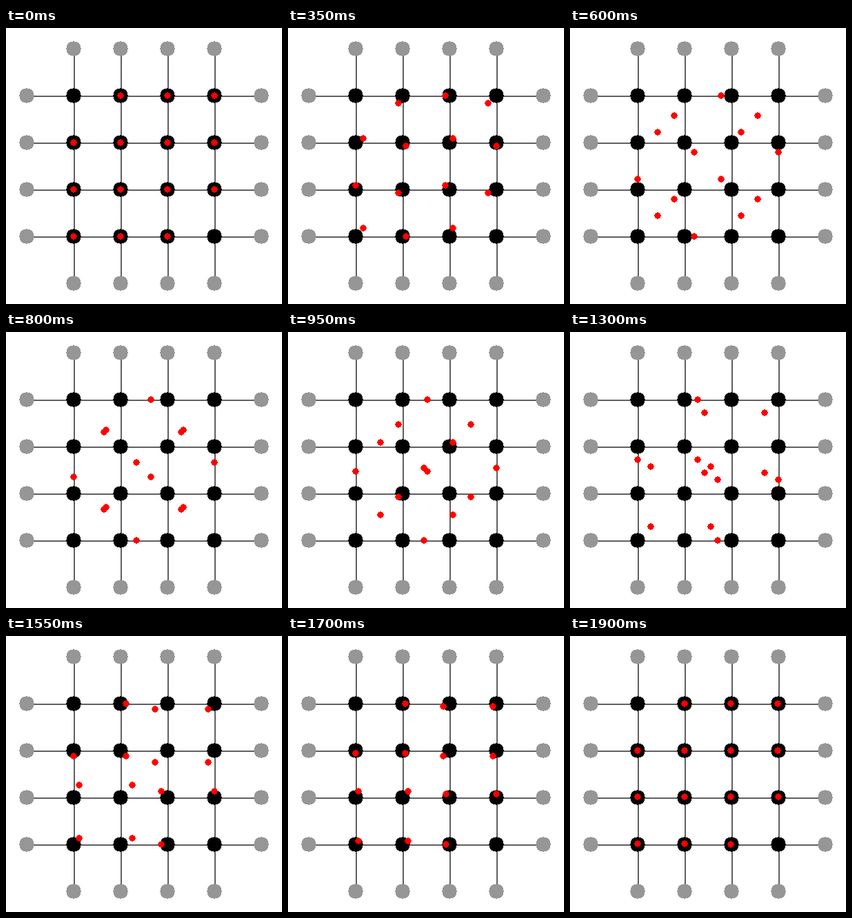
A matplotlib script for the animation above (2 s loop, 400 by 400 pixels).

```python
import math
import matplotlib.pyplot as plt
from matplotlib.animation import FuncAnimation
from matplotlib.patches import Circle

SIZE, DPI = 400, 100
PX = 72 / DPI
FRAMES, INTERVAL = 40, 50
MARGIN, STEP, N = 30, 68, 4

plt.rcParams["toolbar"] = "None"
fig = plt.figure(figsize=(SIZE / DPI, SIZE / DPI), dpi=DPI, facecolor="white")
ax = fig.add_axes([0, 0, 1, 1])
ax.set(xlim=(0, SIZE), ylim=(SIZE, 0))
ax.axis("off")


def coord(k):
    return MARGIN + STEP * k


def disc(x, y, radius, color, z):
    # The stroke supplies the outer pixel, so the hard edge stays round.
    return ax.add_patch(Circle((x, y), radius - 1, facecolor=color,
                               edgecolor=color, linewidth=2 * PX,
                               antialiased=False, zorder=z))


def wire(xs, ys):
    ax.plot(xs, ys, color="#606060", linewidth=2 * PX, antialiased=False,
            snap=False, solid_capstyle="butt", zorder=1)


def cell(i):
    return coord(i % N + 1), coord(i // N + 1)


def shuffled(i):
    """Rotate the four-bit index right by one: a perfect shuffle."""
    return i >> 1 | (i & 1) << 3


lo, hi = coord(0), coord(N + 1)
for k in range(1, N + 1):
    c = coord(k)
    wire([lo, hi], [c + 1, c + 1])
    wire([c + 1, c + 1], [lo, hi])
    for end in (lo, hi):
        disc(end, c, 10, "#969696", 2)
        disc(c, end, 10, "#969696", 2)

for i in range(N * N):
    disc(*cell(i), 10, "black", 2)

paths = [(cell(i), cell(shuffled(i)))
         for i in range(N * N) if shuffled(i) != i]
dots = [disc(*start, 4, "red", 3) for start, _ in paths]


def update(frame):
    t = frame / FRAMES
    s = t * t * (3 - 2 * t)
    for dot, (a, b) in zip(dots, paths):
        dot.center = tuple(math.floor(p + (q - p) * s) for p, q in zip(a, b))
    return dots


anim = FuncAnimation(fig, update, frames=FRAMES, interval=INTERVAL,
                     repeat=True, repeat_delay=0, blit=False)
plt.show()
```
